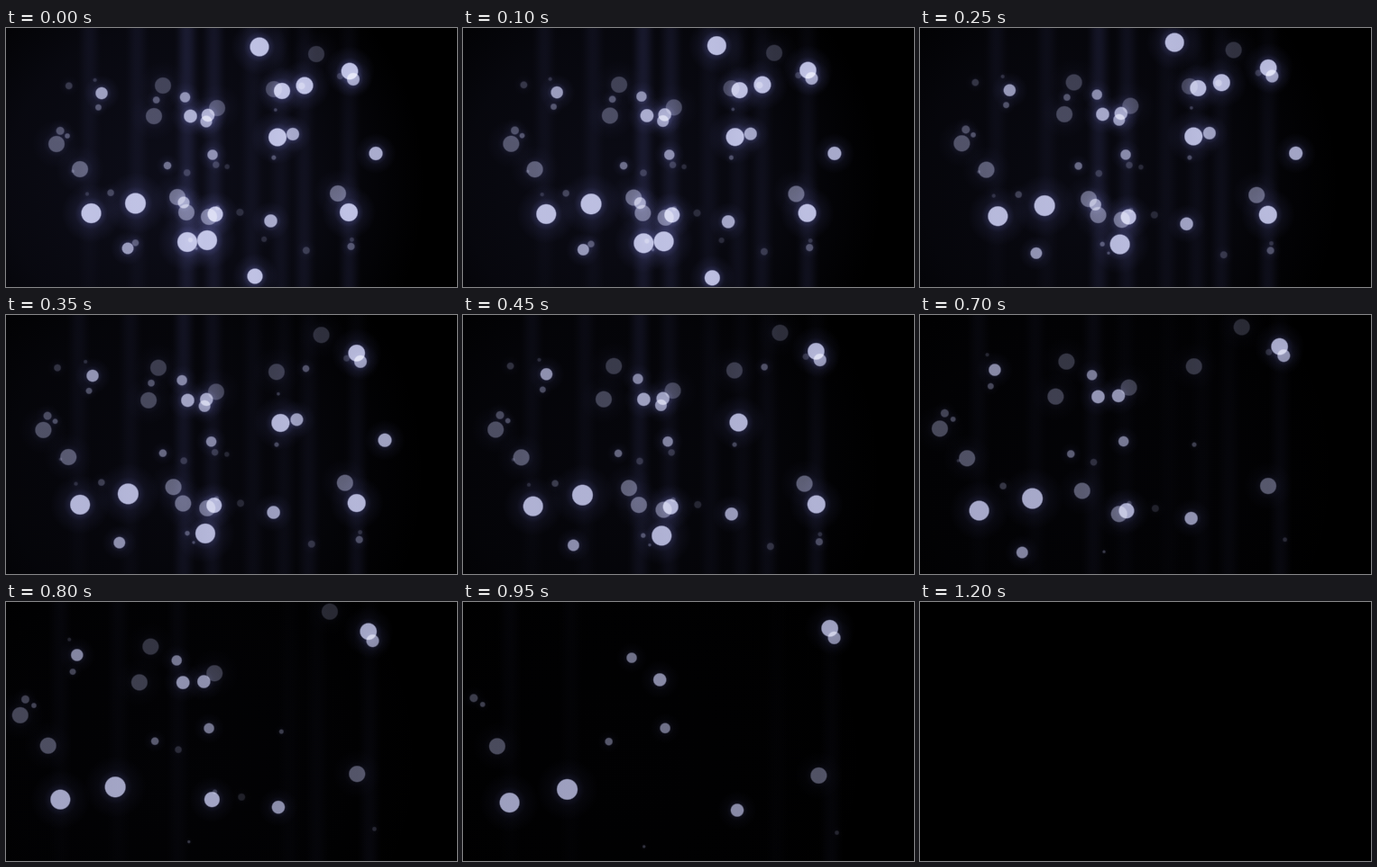
Animation of 500x288 px, one loop 2350 ms. Source, as an HTML page with a canvas:

```html
<!DOCTYPE html>
<html lang="en">
<head>
<meta charset="utf-8">
<title>Drifting lights</title>
<style>
html, body { margin: 0; width: 100%; height: 100%; overflow: hidden; background: #000; }
canvas { display: block; width: 500px; height: 288px; }
</style>
</head>
<body>
<canvas id="stage" width="500" height="288"></canvas>
<script>
const W = 500, H = 288, CX = 250, CY = 144;
const LOOP = 2350, STEP = 50, END = 1200, HOLD = 40;
const ctx = document.getElementById('stage').getContext('2d');

const tint = a => `rgba(205,208,248,${a})`;
const haze = a => `rgba(105,108,200,${a})`;
const left = (t, out) => Math.max(0, 1 - t / out);

// The field is a tilted plane: time until a point would pass the viewer.
const reach = (x, y) => 4800 + 2.5 * x - 4 * y;

// Perspective drift away from the centre.
function zoom(x, y, t) {
  const time = reach(x, y);
  return time / (time - Math.max(0, t - HOLD));
}

function seeded(seed) {
  return () => (seed = seed * 16807 % 2147483647) / 2147483647;
}

// Sharp lights as x, y, radius; each group goes out evenly over its span.
function group(from, to, points) {
  return points.map(([x, y, r], i) => ({
    x, y, r,
    a: Math.min(.87, .06 + .095 * r),
    out: from + (to - from) * (i + 1) / points.length
  }));
}

const sharp = [
  group(0, 250, [[276, 276, 8.5], [201, 238, 11]]),
  group(250, 350, [[197, 194, 6.5], [306, 70, 9], [281, 21, 10.5], [331, 64, 9.5]]),
  group(350, 550, [[318, 118, 7], [410, 139.5, 7.5], [380, 205, 10], [223, 236, 11]]),
  group(550, 700, [[222, 104, 6.5], [301, 121.5, 10]]),
  group(700, 950, [[135, 245, 6.4], [106, 72.5, 6.7], [204.5, 98, 7.3], [232, 207, 8.5]]),
  group(950, END, [
    [68, 120, 2.8], [179, 153, 4.2], [198.5, 77, 5.7], [229, 141, 5.7], [224, 97, 7.2],
    [293.5, 214.5, 7.2], [94.5, 206, 11], [143.5, 195, 11.5], [385, 57, 7], [381, 48, 9.3]
  ])
].flat();

// Large faint lights, first to go out first; lower ones are brighter.
const soft = [
  [200, 205], [225, 210], [190, 188], [297, 68], [56, 129], [174, 64],
  [164, 98], [234, 89], [344, 29], [82, 157], [368, 184]
].map(([x, y], i) => ({ x, y, r: 9, a: .16 + .0015 * y, out: 700 + 30 * i }));

const rnd = seeded(41);
const dust = Array.from({ length: 24 }, () => ({
  x: 60 + 330 * rnd(), y: 20 + 240 * rnd(),
  r: 1.5 + 3 * rnd(), a: .14 + .22 * rnd(), out: 200 + 900 * rnd()
}));

const lights = [...dust, ...soft, ...sharp];

// Beams: x and strength.
const beams = [
  [92, .1], [145, .11], [200, .27], [230, .2], [272, .11], [304, .1], [330, .12], [380, .13]
];

function disc(x, y, r, stops) {
  const g = ctx.createRadialGradient(x, y, 0, x, y, r);
  stops.forEach(([at, color]) => g.addColorStop(at, color));
  ctx.fillStyle = g;
  ctx.fillRect(x - r, y - r, 2 * r, 2 * r);
}

function drawHaze(t) {
  const a = .12 * left(t, END) ** 1.5;
  disc(175, 175, 290, [[0, haze(a)], [.6, haze(a * .65)], [1, haze(0)]]);
}

// Beams lean to the top on the left and to the bottom on the right.
function drawBeam([x0, strength], t) {
  const x = CX + (x0 - CX) * zoom(x0, CY, t);
  const a = strength * left(t, 700 + 4 * Math.abs(x0 - CX)) ** .7;
  const half = 15;
  const g = ctx.createLinearGradient(0, 0, 0, H);
  g.addColorStop(0, haze(a * (1 - x0 / 550)));
  g.addColorStop(1, haze(a * x0 / 400));
  ctx.fillStyle = g;
  for (let px = Math.ceil(x - half); px < x + half; px++) {
    ctx.globalAlpha = .5 + .5 * Math.cos(Math.PI * (px - x) / half);
    ctx.fillRect(px, 0, 1, H);
  }
  ctx.globalAlpha = 1;
}

function drawLight(p, t) {
  if (t >= p.out) return;
  const k = zoom(p.x, p.y, t);
  const x = CX + (p.x - CX) * k, y = CY + (p.y - CY) * k;
  const a = p.a * (1 - .2 * t / END);
  const glow = .33 * p.a * left(t, 1.5 * END);
  disc(x, y, p.r * 3, [[0, haze(glow)], [.33, haze(glow)], [.55, haze(glow * .35)], [1, haze(0)]]);
  const r = p.r + .7;
  disc(x, y, r, [[0, tint(a)], [1 - 1.4 / r, tint(a)], [1, tint(0)]]);
}

function render(time) {
  const t = Math.floor(time % LOOP / STEP) * STEP;
  ctx.globalCompositeOperation = 'source-over';
  ctx.fillStyle = '#000';
  ctx.fillRect(0, 0, W, H);
  if (t >= END) return;
  ctx.globalCompositeOperation = 'screen';
  drawHaze(t);
  beams.forEach(b => drawBeam(b, t));
  lights.forEach(p => drawLight(p, t));
}

const start = performance.now();
function tick() {
  render(performance.now() - start);
  requestAnimationFrame(tick);
}
tick();
</script>
</body>
</html>
```
